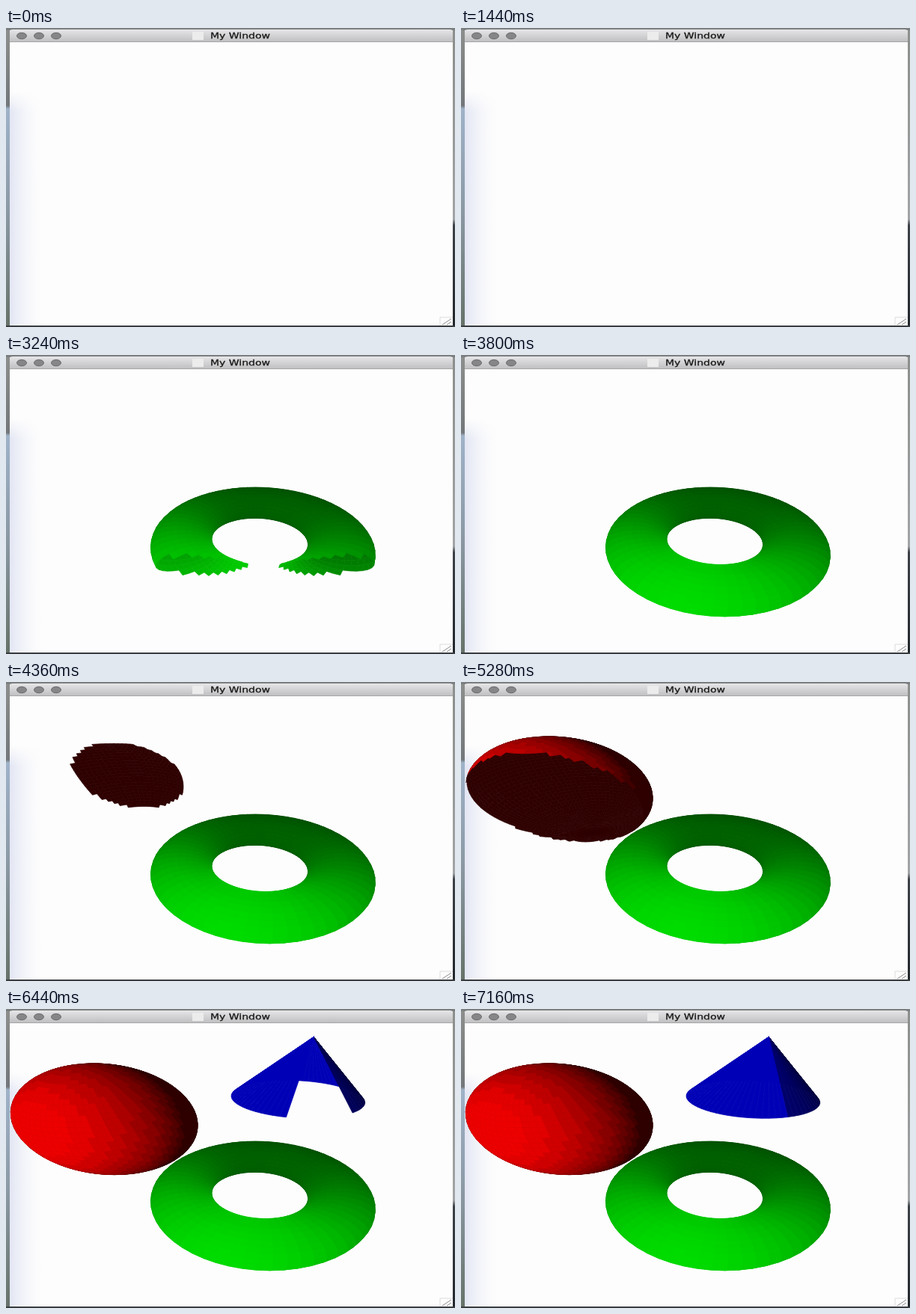
An HTML page with a canvas for the animation above (7.24 s loop, 600x400 px).

```html
<!DOCTYPE html>
<html lang="en">
<head>
<meta charset="utf-8">
<title>My Window</title>
<style>
  html, body { margin: 0; width: 100%; height: 100%; overflow: hidden; background: #fdfdfd; }
  canvas, svg { position: absolute; left: 0; top: 0; width: 600px; height: 400px; }
</style>
</head>
<body>
<canvas id="scene" width="600" height="400"></canvas>
<svg viewBox="0 0 600 400">
  <defs>
    <linearGradient id="bar" x2="0" y2="1">
      <stop offset="0" stop-color="#e6e6e8"/><stop offset="1" stop-color="#bebec0"/>
    </linearGradient>
    <linearGradient id="leftEdge" x2="0" y2="1">
      <stop offset="0" stop-color="#8c8f8c"/><stop offset=".26" stop-color="#74777a"/>
      <stop offset=".27" stop-color="#9fb2c8"/><stop offset=".6" stop-color="#8c9aa6"/>
      <stop offset="1" stop-color="#667268"/>
    </linearGradient>
    <linearGradient id="rightEdge" x2="0" y2="1">
      <stop offset="0" stop-color="#8c8f8c"/><stop offset=".64" stop-color="#a2a4a6"/>
      <stop offset=".66" stop-color="#3c4248"/><stop offset="1" stop-color="#22282c"/>
    </linearGradient>
  </defs>
  <rect width="5" height="400" fill="url(#leftEdge)"/>
  <rect x="597" width="3" height="400" fill="url(#rightEdge)"/>
  <rect y="398" width="600" height="2" fill="#3a3d40"/>
  <rect width="600" height="3" fill="#7c7f80"/>
  <path d="M5 19V5q0-3 4-3H593q4 0 4 3V19Z" fill="url(#bar)"/>
  <path d="M5 18.5H597" stroke="#a6a6a8"/>
  <g fill="#868688" stroke="#6a6a6c">
    <ellipse cx="21" cy="10.5" rx="6.5" ry="4.2"/>
    <ellipse cx="44" cy="10.5" rx="6.5" ry="4.2"/>
    <ellipse cx="67" cy="10.5" rx="6.5" ry="4.2"/>
  </g>
  <rect x="249" y="5" width="15" height="11" fill="#ececec"/>
  <text transform="translate(273 14) scale(1 .75)" font-family="'DejaVu Sans', sans-serif" font-size="14" fill="#1c1c1c" stroke="#1c1c1c" stroke-width=".4">My Window</text>
  <path d="M580 398V387H597" fill="none" stroke="#dcdce0"/>
  <path d="M583 397L595 389M589 397L595 393" stroke="#8c8c90"/>
</svg>
<script>
const LOOP = 7240, STEP = 40, FOCAL = 340, ASPECT = .636;
const LIGHT = [-.4, .33, -.855];
const TAU = 2 * Math.PI, { sin, cos, max, min, round } = Math;
const ctx = document.getElementById('scene').getContext('2d');

// Local axes: x right, w toward the viewer along the ground, h up.
const rotate = ([x, w, h]) => [x, .737 * w - .675 * h, -.675 * w - .737 * h];
const project = ([x, y, z]) => [301 + FOCAL * x / z, 209 + FOCAL * ASPECT * y / z];
const dot = (a, b) => a.reduce((sum, c, i) => sum + c * b[i], 0);

function buildMesh(centre, nu, nv, point, normal, colour, order) {
  const place = (u, v) => rotate(point(u, v)).map((c, i) => c + centre[i]);
  const faces = [];
  for (let i = 0; i < nu; i++) for (let j = 0; j < nv; j++) {
    const u0 = i / nu, u1 = (i + 1) / nu, v0 = j / nv, v1 = (j + 1) / nv;
    const um = (u0 + u1) / 2, vm = (v0 + v1) / 2;
    const middle = place(um, vm), n = rotate(normal(um, vm));
    // Inner sides get no direct light.
    const lit = dot(n, middle) < 0 ? max(0, dot(n, LIGHT)) : 0;
    faces.push({
      corners: [[u0, v0], [u1, v0], [u1, v1], [u0, v1]].map(([u, v]) => project(place(u, v))),
      depth: Math.hypot(...middle),
      colour: colour(lit, um),
      order: order(um, vm)
    });
  }
  return faces.sort((a, b) => b.depth - a.depth);
}

function torus() {
  const R = 2.66, r = 1, brightest = 1.88;
  const point = (u, v) => {
    const a = u * TAU, b = v * TAU, d = R + r * cos(b);
    return [d * cos(a), d * sin(a), r * sin(b)];
  };
  const normal = (u, v) => {
    const a = u * TAU, b = v * TAU;
    return [cos(b) * cos(a), cos(b) * sin(a), sin(b)];
  };
  // Each sector is shaded by its direction around the ring.
  const colour = (lit, u) => {
    const level = ((1 + cos(u * TAU - brightest)) / 2) ** 1.5;
    return `rgb(0,${round(80 + 122 * level + 18 * lit)},0)`;
  };
  return buildMesh([.985, 1.41, 8.8], 64, 28, point, normal, colour,
    (u, v) => (point(u, v)[1] + R + r) / (2 * (R + r)));
}

function ball() {
  const r = 3.15;
  const normal = (u, v) => {
    const a = u * TAU, b = v * Math.PI;
    return [sin(b) * cos(a), sin(b) * sin(a), cos(b)];
  };
  return buildMesh([-4.5, -2.57, 10], 84, 42,
    (u, v) => normal(u, v).map(c => c * r), normal,
    lit => `rgb(${round(min(236, 46 + 18 * round(11.5 * lit)))},0,0)`,
    (u, v) => (normal(u, v)[1] + 1) / 2);
}

function cone() {
  const R = 2.55, H = 2.9, start = 52 / 360;
  const angle = u => (start - u) * TAU;
  const point = (u, v) => [R * v * cos(angle(u)), R * v * sin(angle(u)), H * (1 - v)];
  const normal = u => [.75 * cos(angle(u)), .75 * sin(angle(u)), .66];
  const colour = (lit, u) => {
    const shadow = cos(angle(u) - .35) > .6;
    return `rgb(0,0,${shadow ? round(50 + 75 * lit) : 182})`;
  };
  return buildMesh([2.55, -4.28, 10], 72, 1, point, normal, colour, u => u);
}

const solids = [
  { faces: torus(), from: 1890, to: 3775 },
  { faces: ball(), from: 4058, to: 5870 },
  { faces: cone(), from: 5900, to: 6533 }
];

function paintBackground() {
  ctx.fillStyle = '#fdfdfd';
  ctx.fillRect(0, 0, 600, 400);
  for (let y = 84; y < 398; y++) {
    const strength = min(1, (y - 84) / 28);
    const glow = ctx.createLinearGradient(5, 0, 52, 0);
    glow.addColorStop(0, `rgba(226,229,243,${strength})`);
    glow.addColorStop(1, 'rgba(250,250,253,0)');
    ctx.fillStyle = glow;
    ctx.fillRect(5, y, 47, 1);
  }
}

function paintFace({ corners, colour }) {
  ctx.beginPath();
  corners.forEach(([x, y]) => ctx.lineTo(x, y));
  ctx.closePath();
  ctx.fillStyle = ctx.strokeStyle = colour;
  ctx.fill();
  ctx.stroke();
}

function render(time) {
  paintBackground();
  ctx.lineWidth = .7;
  ctx.lineJoin = 'round';
  for (const { faces, from, to } of solids) {
    const progress = (time - from) / (to - from);
    if (progress <= 0) continue;
    for (const face of faces) if (face.order < progress) paintFace(face);
  }
}

let shown = -1;
function tick() {
  const step = Math.floor(performance.now() % LOOP / STEP);
  if (step !== shown) render(step * STEP);
  shown = step;
  requestAnimationFrame(tick);
}
tick();
</script>
</body>
</html>
```
